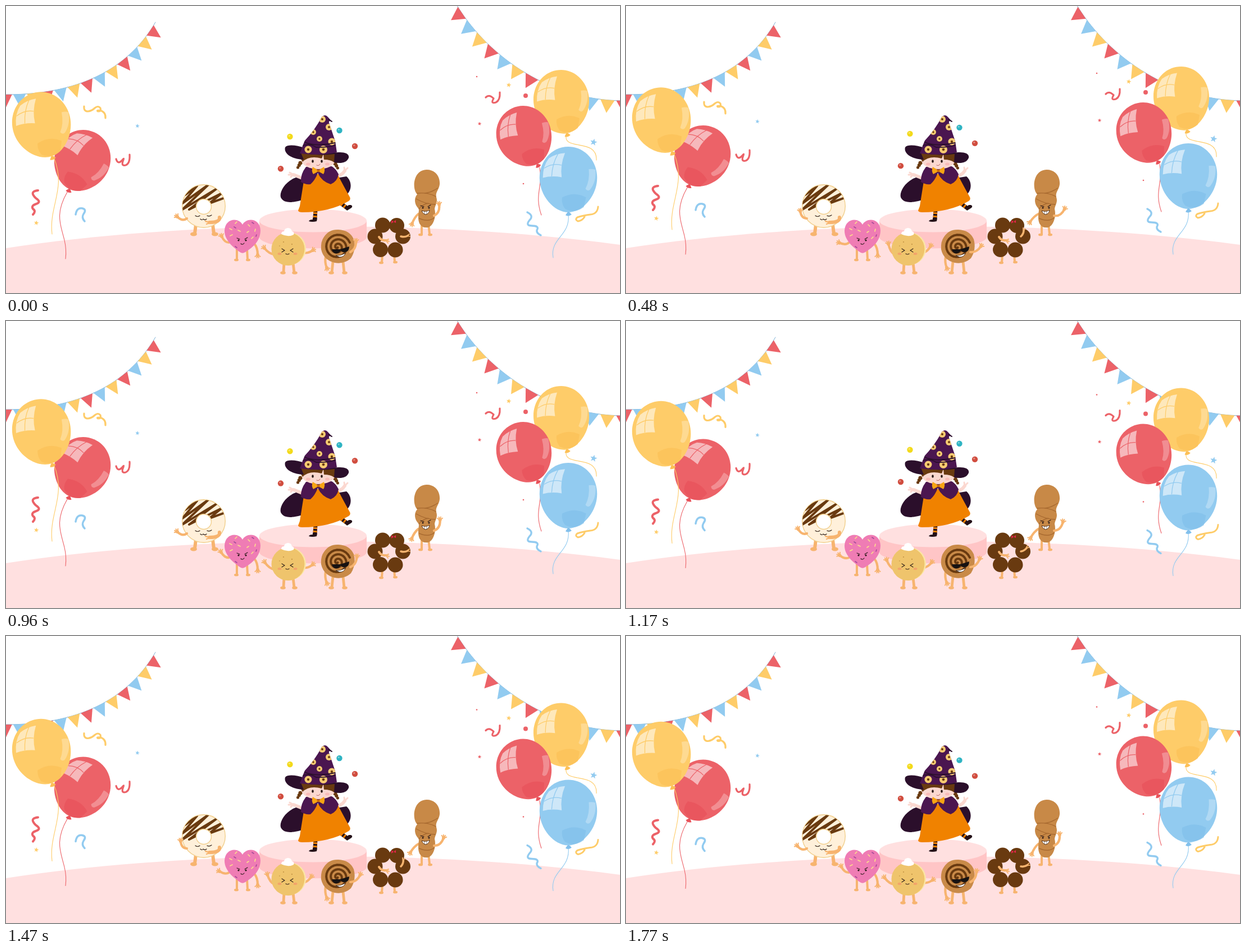
These frames come from a looping animation (1093 by 512 pixels, 1800 ms). An HTML page:

```html
<!DOCTYPE html>
<html lang="en">
<head>
<meta charset="utf-8">
<title>Donut party</title>
<style>
html, body { margin: 0; width: 100%; height: 100%; overflow: hidden; background: #fff; }
svg { display: block; width: 100%; height: 100%; }
.line { fill: none; stroke-linecap: round; stroke-linejoin: round; }
</style>
</head>
<body>
<svg id="stage" viewBox="0 0 1093 512"></svg>
<script>
const RED = '#EC6268', YELLOW = '#FECC69', BLUE = '#92CBF0';
const SKIN = '#FBD8D0', LIMB = '#F7B46F', CHOCO = '#693A10', PURPLE = '#4B1650', NIGHT = '#2B0F2B';
const stage = document.getElementById('stage');

// Shape helpers
const fill = (d, color, more = '') => `<path d="${d}" fill="${color}" ${more}/>`;
const line = (d, color, width = 1, more = '') =>
  `<path class="line" d="${d}" stroke="${color}" stroke-width="${width}" ${more}/>`;
const dot = (x, y, r, color, ry = r) => `<ellipse cx="${x}" cy="${y}" rx="${r}" ry="${ry}" fill="${color}"/>`;
const group = (content, attrs = '') => `<g ${attrs}>${content}</g>`;
const polar = (x, y, r, a) => `${(x + r * Math.cos(a)).toFixed(2)} ${(y + r * Math.sin(a)).toFixed(2)}`;

function star(x, y, r, color) {
  const points = Array.from({ length: 10 }, (_, i) =>
    polar(x, y, i % 2 ? r * 0.42 : r, i * Math.PI / 5 - 1.35));
  return fill(`M${points.join('L')}Z`, color);
}

function bunting(d, colors, start, step, base, height, side) {
  const path = document.createElementNS('http://www.w3.org/2000/svg', 'path');
  path.setAttribute('d', d);
  let out = line(d, '#7FB2D6');
  for (let i = 0; i < 13; i++) {
    const s = start + i * step;
    const a = path.getPointAtLength(s), b = path.getPointAtLength(s + base);
    const k = side * height / base;
    const tipX = (a.x + b.x) / 2 - (b.y - a.y) * k, tipY = (a.y + b.y) / 2 + (b.x - a.x) * k;
    out += fill(`M${a.x} ${a.y}L${b.x} ${b.y}L${tipX} ${tipY}Z`, colors[i % 3]);
  }
  return out;
}

function balloon(x, y, w, h, lean, gleam, color, shade, string) {
  const body = fill('M0-57C30-57 52-32 52-3C52 28 26 57 0 57C-26 57-52 28-52-3C-52-32-30-57 0-57Z', color) +
    fill('M-5 62Q-2 57 0 56Q3 57 6 61Q1 65-5 62Z', shade);
  const light = fill('M-11 31Q11 20 32 31L28 48Q11 60-6 51Q-13 42-11 31Z', shade, 'opacity=".7"') +
    fill('M-46-3Q-46-24-35-37Q-22-45-6-46Q-15-25-12-4Q-30-7-46-3Z', '#fff', 'opacity=".55"') +
    line('M-30-6Q-29-27-19-44M-43-20Q-28-29-13-25', color, 1.3) +
    fill('M37-18Q44-19 49-17Q51 4 39 18Q34 21 31 16Q39 2 37-18Z', '#fff', 'opacity=".28"');
  return line(string, color, 1.1) +
    group(group(body, `transform="rotate(${lean})"`) + group(light, `transform="rotate(${gleam})"`),
      `transform="translate(${x} ${y}) scale(${w / 104} ${h / 114})"`);
}

// An arm with a hand; swing names a motion curve and degrees its reach
function arm(x, y, dx, dy, bx, by, swing = '', degrees = 0) {
  const hx = x + dx, hy = y + dy, aim = Math.atan2(dy - by, dx - bx);
  let d = '';
  for (const spread of [-1, -.35, .3, 1]) d += `M${hx} ${hy}L${polar(hx, hy, 5.4, aim + spread)}`;
  return group(line(`M${x} ${y}Q${x + bx} ${y + by} ${hx} ${hy}`, LIMB, 4.2) +
    dot(hx, hy, 3, LIMB) + line(d, LIMB, 2),
    swing && `data-swing="${swing}" data-pivot="${x} ${y}" data-degrees="${degrees}"`);
}
const leg = (x, y, footX, footY, toe, width = 5) =>
  line(`M${x} ${y}L${footX} ${footY}`, LIMB, width) + dot(footX + toe, footY + 1, width, LIMB, width * .58);

function scenery() {
  return fill('M0 432C330 381 760 381 1093 426V512H0Z', '#FFE0E0') +
    fill('M451 383V412A95.5 20.5 0 0 0 642 412V383Z', '#FFC5C6') + dot(546.5, 383, 95.5, '#FFE0E0', 20.5) +
    bunting('M266 29C223 103 143 158 0 158L-40 159', [RED, YELLOW, BLUE], 6, 24.5, 22.5, 23, -1) +
    bunting('M801-4C851 81 960 169 1100 169L1130 168', [RED, BLUE, YELLOW], 6.5, 28.4, 25.5, 23.5, 1);
}

function leftParty() {
  return balloon(135, 276, 99.5, 111, 24, 33, RED, '#E9525A', 'M109 332C86 372 98 392 104 418Q108 434 106 451') +
    balloon(64, 212, 104, 118, -18, -6, YELLOW, '#FCC057', 'M85 270C108 326 76 356 82 407') +
    line('M139 179Q138 188 146 188Q153 187 158 182Q164 177 168 182Q170 188 164 188Q160 186 167 186Q178 189 177 200', YELLOW, 3.2) +
    line('M196 273Q199 283 206 276Q212 268 208 277Q205 286 213 284Q221 281 220 265', RED, 3.2) +
    line('M57 329Q46 330 48 336Q50 341 56 345Q62 350 54 353Q44 356 48 362Q54 366 48 372', RED, 4) +
    line('M124 372Q126 359 136 361Q144 363 138 371Q134 378 140 384', BLUE, 3.5) +
    star(234, 214, 4, BLUE) + star(54, 387, 4.5, YELLOW);
}

function rightParty() {
  return balloon(989, 171, 99, 114, -10, -3, YELLOW, '#FCC057', 'M997 232C994 258 1053 236 1051 275') +
    balloon(923, 232.5, 97.5, 110, -25, -11, RED, '#E9525A', 'M950 288C956 325 940 335 953 373') +
    balloon(1001, 309.5, 102.5, 117, 0, 0, BLUE, '#82C0EC', 'M1001 372C1005 410 968 414 974 449') +
    line('M854 163Q860 157 868 165Q862 175 872 172Q880 168 879 154', RED, 3.2) +
    line('M928 368Q940 374 932 382Q924 392 936 392Q950 392 945 400Q944 405 952 409', BLUE, 3.4) +
    line('M1054 358Q1053 371 1040 372Q1026 374 1017 377Q1012 381 1018 384Q1026 383 1030 376', YELLOW, 3) +
    star(895, 141, 4.5, YELLOW) + star(843, 210, 3.5, RED) + star(1046, 243, 6.5, BLUE) +
    dot(925, 160, 4, RED) + dot(838, 126, 1.3, RED) + dot(921, 317, 1.3, RED);
}

function witch() {
  const cone = 'M523 263L529 247L532 240Q550 221 562 198Q568 192 573 198L581 207Q574 203 575 208L586 241L589 261Q558 268 523 263Z';
  const rings = [[563, 202, 6], [575, 216, 6], [547, 225, 5], [558, 237, 5], [580, 242, 6.5], [538, 256, 6.5], [565, 256, 7]];
  const sock = d => line(d, '#231018', 7, 'style="stroke-linecap:butt"') +
    line(d, '#F08200', 7, 'style="stroke-linecap:butt" stroke-dasharray="3 3"');
  const braid = (x, y, side) => [0, 1, 2].map(i => dot(x + side * i * 2.2, y + i * 4, 3.6 - i * .5, CHOCO)).join('');
  return fill('M524 304C498 308 484 334 490 343C496 353 513 350 524 347L600 341C617 333 617 313 606 304L594 306Z', NIGHT) +
    sock('M551 362L550 380') + sock('M592 349L608 361') +
    fill('M546 378L554 379L553 384Q545 386 539 384Q540 381 546 381Z', '#231018') +
    fill('M604 361L610 355L614 355Q618 357 615 360L607 365Z', '#231018') +
    line('M527 307L512 301M588 304Q598 302 603 294', SKIN, 6) +
    line('M512 301L505 297M511 301L503 301M510 302L507 305M603 294L602 288M604 293L608 289', SKIN, 3) +
    fill('M532 300L523 357L520 365Q521 368 527 368Q576 368 610 348Q615 345 611 339Q602 323 590 300Z', '#F08200') +
    fill('M534 287Q524 300 525 314Q533 319 542 318Q550 311 555 298Q562 313 578 318Q590 313 592 300Q587 290 580 286Z', PURPLE) +
    braid(524, 280, -1) + braid(586, 281, 1) +
    dot(556, 275, 30, SKIN, 16) +
    fill('M524 258H587Q588 272 584 279Q578 274 566 274L565 264L562 272Q540 266 528 278Q522 271 524 258Z', CHOCO) +
    dot(546, 277, 1.8, '#2a1a18', 2.7) + dot(562, 277, 1.8, '#2a1a18', 2.7) +
    dot(538, 282, 4, '#F9BDB9', 2.5) + dot(572, 282, 4, '#F9BDB9', 2.5) +
    line('M553 284Q557 286 559 282', '#B7605A') +
    fill('M556 293L546 287Q543 294 547 300L556 295L565 300Q569 293 566 287Z', '#F7A414') + dot(556, 294, 2.5, '#C96A10') +
    fill('M530 274C506 273 494 262 497 252C502 246 519 249 531 253L582 262C600 259 612 262 610 271C606 281 594 281 584 279L585 264Q555 268 525 262Z', NIGHT) +
    fill(cone, PURPLE) +
    `<clipPath id="cone"><path d="${cone}"/></clipPath>` +
    group(rings.map(([x, y, r]) => dot(x, y, r, '#F7CB72') + dot(x, y, r * .33, CHOCO)).join('') +
      line('M530 242Q548 252 586 244M526 250Q540 244 552 252Q570 253 588 248', NIGHT, 1.8), 'clip-path="url(#cone)"') +
    line('M574 202L580 206', NIGHT, 2);
}

const jugglingBalls = () =>
  [[505.5, 233, '#F3DA1B'], [593.5, 222, '#2FB4C3'], [621, 250, '#D14D3F'], [489, 290.3, '#D14D3F']]
    .map(([x, y, color]) => dot(x, y, 5.2, color) + dot(x - 1.3, y - 1.5, 1.6, '#ffffff60')).join('');

function glazedDonut() {
  return leg(338, 390, 336, 406, -2, 6) + leg(368, 390, 370, 406, 2, 6) +
    `<clipPath id="glaze"><circle cx="352" cy="357" r="38"/></clipPath>` +
    `<circle cx="352" cy="357" r="38.3" fill="#FFF0DA" stroke="#F1CF8C" stroke-width="1.4"/>` +
    group(line('M319 337L340 321L314 352L360 319L314 363L375 326L326 363L384 334L362 352L390 342', CHOCO, 4),
      'clip-path="url(#glaze)"') +
    '<circle cx="352" cy="358" r="13.5" fill="#fff" stroke="#F1CF8C" stroke-width="1.4"/>' +
    line('M337 374Q341 377 345 374M358 374Q362 376 366 373M346 380Q349 383 351 380Q354 383 357 380', '#33231a', 1.2) +
    line('M380 377Q382 386 362 386', LIMB, 6) + line('M362 386L355 384M362 387L357 389', LIMB, 2.4) +
    arm(322, 379, -17, -3, -8, 6, 'slow', 42);
}

function heart() {
  const sprinkles = 'M398 397L402 399M408 388L411 385M431 390L434 393M444 398L443 402M399 410L403 408M440 412L437 415M413 400L417 402M429 404L432 402';
  return leg(411, 434, 411, 452, -1, 4) + leg(429, 434, 430, 452, 1, 4) +
    arm(397, 422, -13, -11, -8, 0, 'wave', -45) + arm(442, 424, 6, 20, 6, 7) +
    fill('M421 390C414 377 390 378 389 401C389 420 409 434 418 440Q422 442 426 439C441 430 453 418 453 400C452 378 428 377 421 390Z', '#EF7CB4') +
    line(sprinkles, '#FBDF8A', 1.7) + line('M406 394L409 396M438 386L441 388M408 429L411 431M446 408L445 411', '#A74B9A', 1.7) +
    dot(414, 418, 1.6, '#2a1a18') + dot(427, 418, 1.6, '#2a1a18') +
    line('M411 414L416 416M425 416L430 413M418 424Q421 427 424 423', '#2a1a18', 1.1);
}

function creamPuff() {
  return leg(495, 458, 494, 475, -1, 4.8) + leg(511, 458, 513, 475, 1, 4.8) +
    arm(478, 443, -18, -11, -9, 0, 'wave', 30) + arm(529, 440, 17, -4, 8, 2, 'wave', -30) +
    dot(505, 433, 29, '#FBE6A4') + dot(502, 433.5, 29.5, '#EFC46C') +
    fill('M490 407Q490 402 495 402Q496 396 502 396Q508 396 509 402Q514 403 512 408Q502 413 490 407Z', '#fff') +
    dot(487, 442, 3.5, '#F2A36B', 2) + dot(515, 442, 3.5, '#F2A36B', 2) +
    line('M491 433L496 436L491 439M511 433L506 436L511 439M498 442Q501 444 504 442', '#33231a', 1.2) +
    dot(494, 421, .9, '#B98A3C') + dot(509, 425, .9, '#B98A3C') + dot(487, 428, .8, '#B98A3C');
}

function cinnamonRoll() {
  const coil = Array.from({ length: 71 }, (_, i) => polar(590, 430, 1 + i * .32, i * .25 + 1));
  return leg(582, 456, 580, 475, -1, 4.8) + leg(600, 456, 602, 475, 1, 4.8) +
    arm(569, 447, 2, 20, -2, 10) +
    fill('M566 412Q575 398 592 399Q612 400 619 416Q624 434 614 450Q602 461 585 458Q565 453 561 434Q560 420 566 412Z', '#C98A48') +
    line('M' + coil.join('L'), CHOCO, 4) +
    fill('M580 434L595 434L611 429Q611 438 604 439Q598 440 596 436Q592 443 585 441Q581 439 580 434Z', '#171212') +
    fill('M587 445Q596 446 604 441Q602 448 594 448Z', '#fff', 'stroke="#33231a" stroke-width=".8"') +
    arm(613, 439, 10, -19, 10, -5, 'wave', 36);
}

function beadRing() {
  const beads = [[670.5, 391], [695.5, 391.5], [706.5, 411], [693, 435], [666.5, 434.5], [657, 411]];
  return leg(670, 444, 669, 457, -1, 4) + leg(691, 444, 692, 456, 1, 4) +
    beads.map(([x, y]) => dot(x, y, 13.5, CHOCO)).join('') +
    fill('M690 385L686 382V388ZL694 382V387Z', '#E5254B') +
    line('M664 412Q668 419 676 418', LIMB, 4) + line('M676 418L681 416M676 418L682 420M676 418L680 423', LIMB, 2) +
    group(line('M703 411Q709 413 715 410', LIMB, 3.6) + line('M715 409L718 407M715 410L719 411', LIMB, 1.8),
      'data-swing="slow" data-pivot="703 411" data-degrees="-68"');
}

function twist() {
  return leg(740, 388, 740, 407, -2, 4) + leg(752, 388, 754, 407, 1, 4) +
    arm(734, 371, -11, 17, -7, 6, 'wave', 14) +
    fill('M749 292C764 292 773 304 772 318C771 328 764 332 766 341C769 350 764 355 763 362C766 374 762 391 752 395Q741 397 736 388C732 378 735 370 735 362C728 356 725 344 732 336C722 326 725 292 749 292Z', '#C88947') +
    line('M732 334Q752 332 765 340M730 344Q748 354 764 354M735 362Q742 353 752 352M745 334Q757 333 768 325M736 379Q752 386 762 378', '#A86A30', 1.4) +
    dot(742, 360, 1.5, '#2a1a18') + dot(753, 360, 1.5, '#2a1a18') +
    line('M738 356L744 358M751 358L756 355', '#2a1a18', 1.1) +
    fill('M740 365Q747 368 754 364Q753 371 747 372Q742 371 740 365Z', '#fff', 'stroke="#4A260C" stroke-width=".9"') +
    line('M745 366V371M749 366V371', '#4A260C', .6) +
    arm(762, 374, 9, -20, 11, -5, 'wave', 36);
}

stage.innerHTML = scenery() + group(leftParty(), 'id="left"') + group(rightParty(), 'id="right"') +
  witch() + group(jugglingBalls(), 'id="balls"') +
  twist() + glazedDonut() + heart() + creamPuff() + cinnamonRoll() + beadRing();

// Linear there-and-back motion, 0 to 1 to 0
const triangle = (t, period) => 1 - Math.abs(1 - 2 * (t % period) / period);
const slowSwing = t => t < 960
  ? (t < 540 ? t / 540 : (960 - t) / 420)
  : (t < 1500 ? (t - 960) / 540 : (1800 - t) / 300);

const swingers = [...document.querySelectorAll('[data-swing]')];
const lift = (id, y) => document.getElementById(id).setAttribute('transform', `translate(0 ${y})`);
const begin = performance.now();

function draw(now) {
  const t = Math.floor(Math.max(0, now - begin) % 1800 / 30) * 30;
  lift('left', -15 * triangle(t, 1800));
  lift('right', 8 - 15 * triangle(t + 480, 1800));
  lift('balls', -5.5 * triangle(t, 900));
  const swing = { wave: triangle(t, 900), slow: slowSwing(t) };
  for (const el of swingers) {
    const { swing: kind, pivot, degrees } = el.dataset;
    el.setAttribute('transform', `rotate(${degrees * swing[kind]} ${pivot})`);
  }
  requestAnimationFrame(draw);
}
draw(begin);
</script>
</body>
</html>
```
